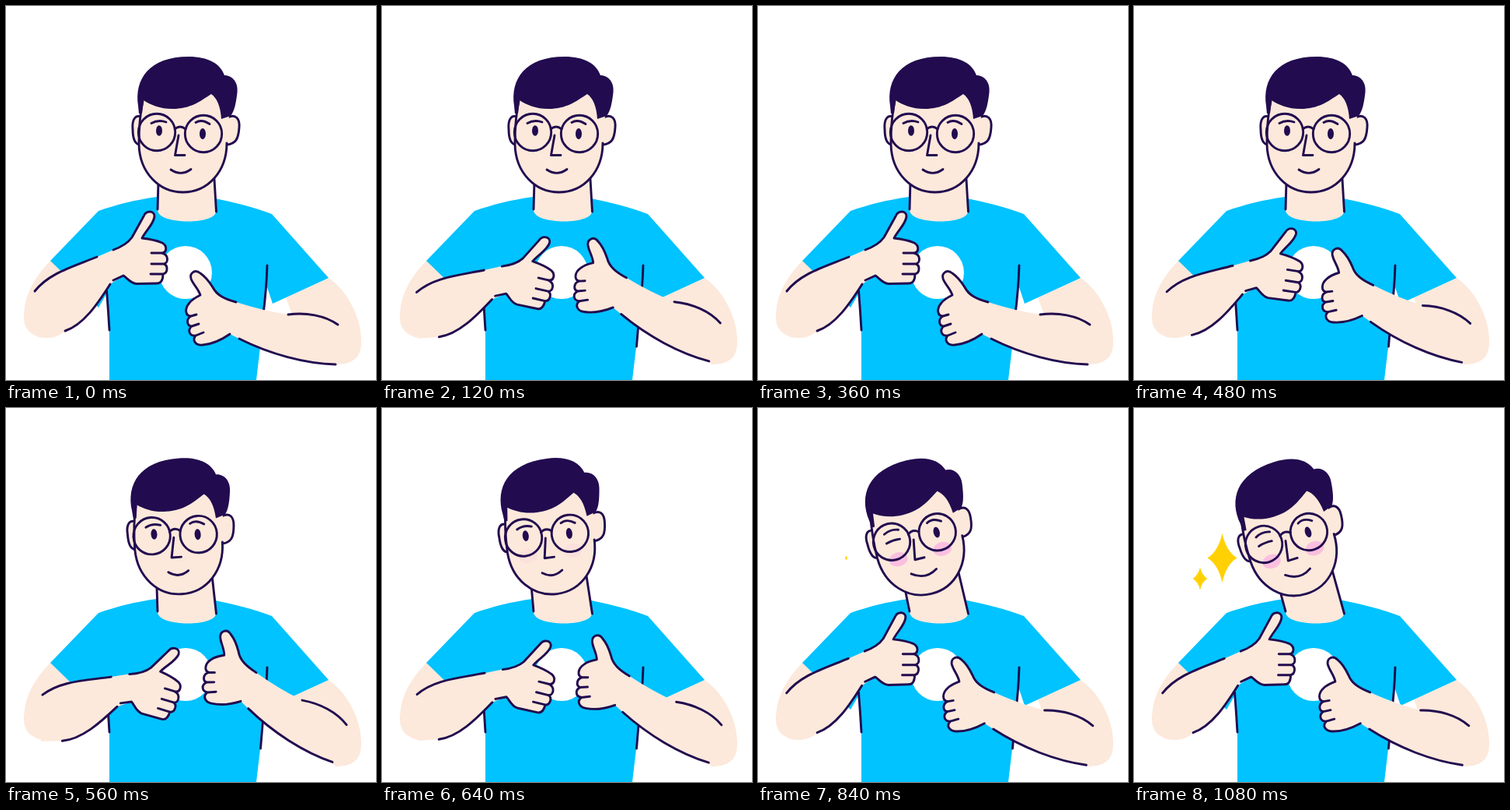
An HTML page with a canvas that plays this animation: 476 px wide and 480 px high, repeating every 1.96 s.

```html
<!DOCTYPE html>
<html lang="en">
<head>
<meta charset="utf-8">
<title>Thumbs up</title>
<style>
html, body { margin: 0; width: 100%; height: 100%; overflow: hidden; background: #fff; }
canvas { display: block; width: 100vw; height: 100vh; }
</style>
</head>
<body>
<canvas id="stage" width="476" height="480"></canvas>
<script>
const ctx = document.getElementById('stage').getContext('2d');
const INK = '#220b4f', SKIN = '#fce9db', BLUE = '#00c3ff', PINK = '#fbbfe0', GOLD = '#ffd105';
const LOOP = 1960, STEP = 40, REST = 1080, TILT = -17.3;
const NECK = { x: 223, y: 257 };

const clamp = v => Math.max(0, Math.min(1, v));
const mix = (a, b, u) => a + (b - a) * u;
const span = (t, a, b) => clamp((t - a) / (b - a));
const ease = u => (1 - Math.cos(Math.PI * u)) / 2;

function fill(d, color) {
  ctx.fillStyle = color;
  ctx.fill(new Path2D(d));
}

function line(d) {
  ctx.strokeStyle = INK;
  ctx.lineWidth = 2.9;
  ctx.stroke(new Path2D(d));
}

function oval(x, y, rx, ry, color) {
  ctx.fillStyle = color;
  ctx.beginPath();
  ctx.ellipse(x, y, rx, ry, 0, 0, Math.PI * 2);
  ctx.fill();
}

function turned(x, y, deg, draw) {
  ctx.save();
  ctx.translate(x, y);
  ctx.rotate(deg * Math.PI / 180);
  ctx.translate(-x, -y);
  draw();
  ctx.restore();
}

function around(p, x, y, deg) {
  const a = deg * Math.PI / 180, c = Math.cos(a), s = Math.sin(a);
  const dx = x - p.x, dy = y - p.y;
  return (p.x + dx * c - dy * s) + ',' + (p.y + dx * s + dy * c);
}

// Eased path through [time, value] keys
function follow(keys, t) {
  for (let i = 1; i < keys.length; i++) {
    const [t0, a] = keys[i - 1], [t1, b] = keys[i];
    if (t < t1) return mix(a, b, ease((t - t0) / (t1 - t0)));
  }
  return keys[keys.length - 1][1];
}

const swing = [[0, 0], [180, 1], [330, 0], [380, 0], [580, 1.02]];
const leftSwing = [...swing, [778, -0.03]];
const rightSwing = [...swing, [778, 0.35]];

function body() {
  fill('M57,327 C30,355 23,378 23,400 C23,418 38,427 55,426 C65,425 70,422 76,417 L88,385 L84,345 Z', SKIN);
  fill('M360,374 L415,349 C443,368 458,406 457,432 C457,452 445,460 424,460 L375,415 Z', SKIN);
  fill('M194,245 C165,249 142,255 119,263 L57,327 L119,387 L130,368 L133,417 L133,480 L322,480 ' +
    'L327,438 L335,358 L343,382 L415,349 L342,267 C318,258 294,252 269,247 Z', BLUE);
  line('M129.500,365 Q131.500,390 133,416');
  line('M336,333 Q335,365 331,395 L327.500,437');
}

function neck(tilt) {
  const l = around(NECK, 196, 225, tilt), r = around(NECK, 268, 222, tilt);
  fill(`M${l} L195,262 C196,281 269,281 270,264 L${r} Z`, SKIN);
  line(`M${l} L195,261`);
  line(`M${r} L270.5,264`);
}

function face(turn, wink, blush) {
  const ears = 'M174,142 C165,139 162,148 163,158 C163,171 166,178 173,178 ' +
    'M285,143 C296,138 301,145 300,156 C299,170 296,177 284,178';
  const jaw = 'M176,122 C172,140 171,160 171,178 C172,214 197,239 227.500,239 C260,239 284,212 284,176';
  fill(ears, SKIN);
  line(ears);
  fill(jaw + ' L287,140 L285,120 L230,95 Z', SKIN);
  line(jaw);

  // The hair lags a little behind the head
  ctx.save();
  ctx.translate(3 * turn, 0);
  fill('M170,128 C165,94 184,65 235,65 C260,65 276,74 281,89 C292,89 299,99 297.500,111 ' +
    'C296,124 294,135 289,141 L277,145 C276,128 271,118 264,113 C250,122 238,132 214,132 ' +
    'C198,132 186,127 177,121 L175,138 L171,138 Z', INK);
  ctx.restore();

  ctx.globalAlpha = blush;
  oval(197, 186, 12, 9, PINK);
  oval(255, 186.5, 12, 9, PINK);
  ctx.globalAlpha = 1;

  for (const [x, y] of [[194, 162], [254, 164]]) {
    ctx.beginPath();
    ctx.arc(x, y, 23.7, 0, Math.PI * 2);
    ctx.stroke();
  }
  line('M217,158 Q224,152 231,158');
  line('M187,150.500 Q196,145.500 206,149');
  line('M244,149.500 Q252,144.500 262,151.500');

  if (wink < 1) oval(197, 160, 4, 6.8 * (1 - 0.8 * wink), INK);
  else line('M187,162.500 Q196,160 205,161');
  oval(253, 164, 4, 7, INK);

  line('M222,166 L217.500,191.500 L230,191.500');
  const grow = 3.5 * wink;
  line(`M${212 - grow},${210 - grow * 0.6} Q225,${219 + grow * 0.3} ${238 + grow},209.5`);
}

function leftArm(p) {
  const fore = 'M37,366 C55,343 85,335 117,322';
  const under = 'M76,417 C100,409 118,382 134,357';
  const thumb = 'M138,313 C149,309 157,304 162,297 L177,270 C180,262 191,262 191,270 ' +
    'C190,280 180,288 175,298 C184,299 194,301 201,304 C208,308 207,317 200,317';
  const palm = 'C202,352 199,356 194,356 L168,356.500 C160,356 156,349 151,346';
  fill(fore + ' L138,313 L151,346 L134,357 C118,382 100,409 76,417 L50,424 L30,395 Z', SKIN);
  line(fore);
  line(under);

  turned(140, 332, 3 * p, () => {
    fill(thumb + ' C210,319 209,330 203,331 C209,333 208,343 202,344 ' + palm + ' L134,354 L128,332 Z', SKIN);
    line(thumb + ' L187,317 M200,317 C210,319 209,330 203,331 L187,331 ' +
      'M203,331 C209,333 208,343 202,344 L186,344 M202,344 ' + palm + ' L138,352');
  });
}

function rightArm() {
  const thumb = 'M296,380 C281,376 271,371 266,361 C261,353 256,347 250,343 ' +
    'C243,337 236,343 238,350 C241,358 247,362 250,371 C244,374 239,377 236,381 C229,389 231,398 238,398';
  const upper = 'C386,393 410,397 427,409';
  fill(thumb + ' C231,402 233,411 239,411 C233,416 236,424 244,423 C239,429 244,436 253,435 ' +
    'C266,434 278,428 288,421 L300,427 C340,447 385,459 424,460 L442,438 L427,409 ' +
    'C410,397 386,393 363,396 Q330,391 296,380 Z', SKIN);
  line('M363,396 ' + upper);
  line('M300,427 C340,447 385,459 424,460');
  line(thumb + ' L245,396 M238,398 C231,402 233,411 239,411 L248,408 ' +
    'M239,411 C233,416 236,424 244,423 L254,419 M244,423 C239,429 244,436 253,435 C266,434 278,428 288,421');
}

function sparkle(x, y, w, h, size) {
  if (size <= 0) return;
  ctx.save();
  ctx.translate(x, y);
  ctx.scale(w * size, h * size);
  fill('M0,-1 Q0.27,-0.27 1,0 Q0.27,0.27 0,1 Q-0.27,0.27 -1,0 Q-0.27,-0.27 0,-1 Z', GOLD);
  ctx.restore();
}

function draw(t) {
  const turn = 1 - Math.pow(1 - span(t, 480, 1080), 1.78);
  const tilt = TILT * turn;
  const left = follow(leftSwing, t);
  ctx.fillStyle = '#fff';
  ctx.fillRect(0, 0, 476, 480);
  ctx.lineCap = ctx.lineJoin = 'round';

  body();
  oval(231, 342, 34, 34, '#fff');
  neck(tilt);
  turned(NECK.x, NECK.y, tilt, () => face(turn, span(t, 690, 840), span(t, 600, 800)));
  turned(33, 407, 14.2 * left, () => leftArm(left));
  turned(440, 444, 17.6 * follow(rightSwing, t), rightArm);
  sparkle(113.5, 192.5, 19, 31.5, ease(span(t, 800, 1000)));
  sparkle(85, 219, 9.5, 14.5, ease(span(t, 880, 1060)));
}

const start = performance.now();
function tick() {
  const t = (performance.now() - start) % LOOP;
  draw(Math.min(REST, Math.floor(t / STEP) * STEP));
  requestAnimationFrame(tick);
}
tick();
</script>
</body>
</html>
```
